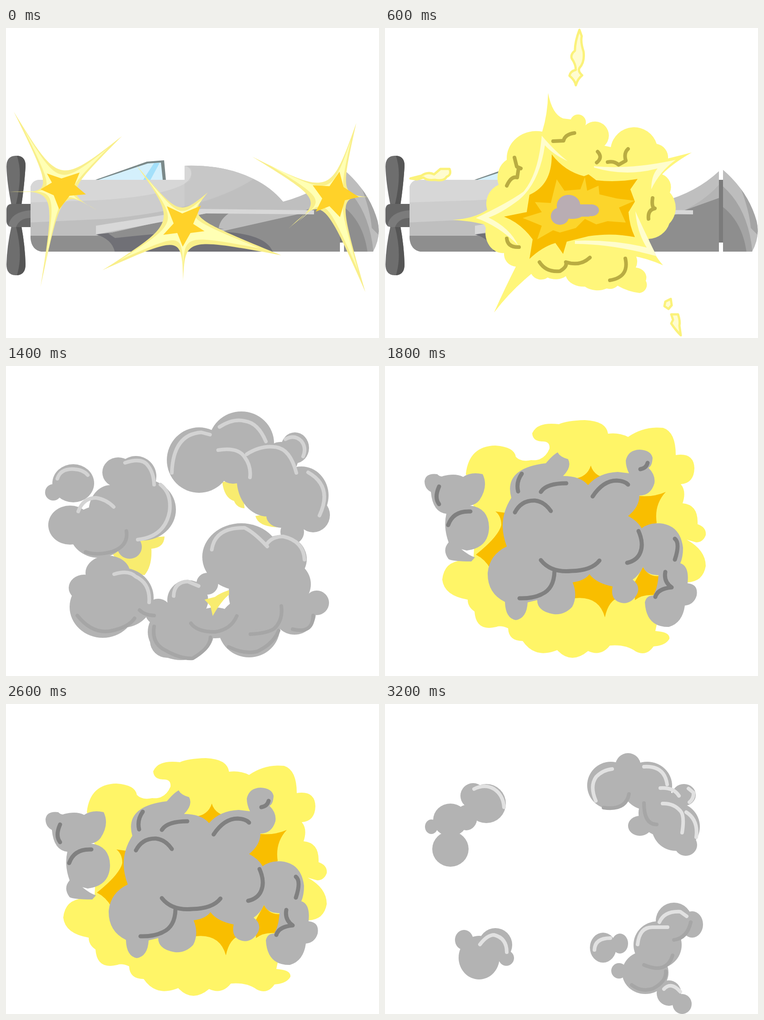
Animation of 821x682 px, one loop 3.4 s. Source, as an HTML page without scripts:

```html
<!DOCTYPE html>
<html lang="en">
<head>
<meta charset="utf-8">
<title>Plane explosion</title>
<style>
html, body { margin: 0; width: 100%; height: 100%; overflow: hidden; background: #fff; }
svg { display: block; width: 100%; height: 100%; }
/* --k is the 200 ms step at which a drawing first appears */
.once, .cycle, .plane {
  opacity: 0;
  animation: once 3.4s step-end calc(var(--k, 0) * 200ms - 3402ms) infinite;
}
.cycle { animation-name: cycle; }
.plane { animation-name: plane; }
@keyframes once { 0% { opacity: 1 } 5.882%, 100% { opacity: 0 } }
@keyframes plane { 0% { opacity: 1 } 23.529%, 100% { opacity: 0 } }
@keyframes cycle {
  0%, 23.529%, 47.058% { opacity: 1 }
  5.882%, 29.411%, 52.941%, 100% { opacity: 0 }
}
.line { fill: none; stroke-width: 8; stroke-linecap: round; stroke-linejoin: round; }
.smoke { fill: #b3b3b3; }
.glow { fill: #f9ef8a; }
.pale { fill: #ffffb4; }
.core { fill: #ffd229; }
</style>
</head>
<body>
<svg viewBox="0 0 821 682" preserveAspectRatio="none">
<defs>
  <clipPath id="body"><path id="hull" d="M54 350Q58 334 76 334H393V303Q480 300 545 332Q583 350 610 382Q685 362 735 315V492H78Q56 488 54 462Z"/></clipPath>
  <clipPath id="fin"><path d="M744 312Q800 360 818 425Q826 460 808 492H744Z"/></clipPath>

  <path id="s1" d="M17 184C117 346 117 346 255 238C132 363 132 363 201 401C122 355 122 355 76 570C109 358 109 358 6 360C105 363 105 363 17 184Z"/>
  <path id="s2" d="M287 302C381 413 381 413 444 362C401 416 401 416 606 500C394 461 394 461 390 558C387 455 387 455 212 533C377 428 377 428 287 302Z"/>
  <path id="s3" d="M771 209C736 367 736 367 811 373C730 368 730 368 791 581C698 370 698 370 622 441C697 379 697 379 542 283C714 369 714 369 771 209Z"/>
  <g id="star1">
    <use href="#s1" class="glow"/>
    <use href="#s1" class="pale" transform="translate(117 357) scale(.78) translate(-117 -357)"/>
    <path class="core" d="M90 320L122 331 162 318 151 345 176 366 140 369 117 399 105 368 76 355 101 340Z"/>
  </g>
  <g id="star2">
    <use href="#s2" class="glow"/>
    <use href="#s2" class="pale" transform="translate(389 430) scale(.78) translate(-389 -430)"/>
    <path class="core" d="M354 392L388 408 429 391 412 431 437 447 406 451 389 481 377 451 346 455 369 430Z"/>
  </g>
  <g id="star3">
    <use href="#s3" class="glow"/>
    <use href="#s3" class="pale" transform="translate(720 371) scale(.78) translate(-720 -371)"/>
    <path class="core" d="M734 316L743 350 777 372 746 379 735 416 712 392 682 404 696 375 675 346 712 348Z"/>
  </g>

  <g id="burst">
    <path fill="#fff67a" d="M359 143Q368 190 392 199L409 201A17 17 0 0 1 441 214A28 28 0 0 1 483 259L497 262A52 52 0 0 1 598 255A30 30 0 0 1 623 287L675 274Q630 300 610 322A30 30 0 0 1 627 362A50 50 0 0 1 626 430A50 50 0 0 1 580 464Q588 495 612 522Q580 508 553 503A20 25 0 0 1 552 527A25 22 0 0 1 574 556A18 18 0 0 1 560 583Q535 580 512 567A25 25 0 0 1 488 573A40 30 0 0 1 440 569A40 30 0 0 1 398 546A30 20 0 0 1 358 549A25 25 0 0 1 322 541Q275 580 240 626Q265 570 288 525A28 28 0 0 1 262 495A38 45 0 0 1 222 440L218 432Q185 424 148 422Q195 420 225 400A45 45 0 0 1 250 345A40 45 0 0 1 268 290A65 60 0 0 1 346 228Q358 190 359 143Z"/>
    <g fill="#fffdcd">
      <path d="M345 237Q375 272 402 293Q370 278 352 258Q340 340 295 378Q255 408 228 417Q275 440 293 478Q250 435 200 418Q270 385 305 360Q338 320 345 237Z"/>
      <path d="M460 304Q540 312 640 290Q605 315 586 355Q586 325 600 309Q530 328 460 307Z"/>
      <path d="M418 468Q500 465 576 483Q555 450 551 403Q572 450 598 502Q500 475 418 475Z"/>
    </g>
    <path fill="#f8bd00" d="M367 278Q395 315 438 326L448 322 465 335Q510 340 556 332L540 355 550 382 536 405Q538 435 550 460Q500 450 448 458L400 470 392 497 375 473Q345 482 318 508L325 465Q300 430 262 415L312 405 318 367Q368 345 367 278Z"/>
    <path fill="#fcd52b" d="M378 333L395 358 430 355 440 328 445 358 470 347 472 366 510 375 550 380 515 395 530 428 490 425 465 432 440 420 420 440 385 450 370 445 335 465 345 435 303 418 345 405 330 383 365 385Z"/>
    <g fill="#b9adb3">
      <ellipse cx="404" cy="391" rx="26" ry="24"/><ellipse cx="385" cy="414" rx="20" ry="19"/>
      <ellipse cx="412" cy="406" rx="27" ry="14"/><ellipse cx="454" cy="401" rx="17" ry="13"/>
      <path d="M420 388H450V415H420Z"/>
    </g>
    <path class="line" stroke="#b9ac42" stroke-width="7" d="M370 249L393 248Q396 234 417 231M285 285L290 305 299 309M268 347Q278 325 291 329L294 308M468 272Q480 285 466 296M490 295Q505 292 514 301L530 292Q525 275 535 266M589 374Q586 395 594 397Q578 400 580 420M268 463Q270 483 295 482M340 515Q355 538 385 535Q402 525 398 515Q430 525 451 505M529 507Q538 548 495 555"/>
  </g>

  <g id="shards" fill="#fffcd0" stroke="#fbf27a" stroke-width="5" stroke-linejoin="round">
    <path d="M428 4Q418 30 418 50Q408 58 411 67Q420 80 420 92Q408 95 406 105Q418 115 420 126Q424 112 434 104Q424 95 428 88Q440 75 437 52Q430 30 433 18Z"/>
    <path d="M629 596L631 610 624 618 615 612 617 602Z"/>
    <path d="M630 630L645 630Q650 645 648 655L651 676Q640 665 630 650L634 642Z"/>
  </g>
  <path id="shard" fill="#fffcd0" stroke="#fbf27a" stroke-width="5" stroke-linejoin="round" d="M56 331L80 325Q95 315 108 322L122 310 142 310Q147 323 136 327Q130 338 110 334Q92 336 85 329L70 333Z"/>

  <path id="cloud" d="M178 237Q185 176 243 175Q285 178 288 200Q300 212 322 207Q350 210 362 182Q364 165 345 166Q325 165 324 148Q335 122 383 128Q400 120 440 119Q487 121 491 149Q515 146 535 156Q570 132 612 136Q640 145 640 196Q680 190 681 225Q680 258 651 260Q664 275 655 302Q690 305 688 348Q708 355 706 372Q700 388 685 388L664 382Q706 405 706 440Q700 475 665 476L600 560 595 583Q628 585 626 600Q618 615 591 617Q575 640 552 628Q530 612 495 615Q475 640 447 627Q410 658 379 625Q330 645 303 605Q272 605 271 577Q255 570 245 574Q200 585 197 540Q182 530 182 514Q130 505 126 470Q130 430 170 428L195 420 200 330Z"/>

  <path id="plume" class="smoke" d="M354 214Q370 195 380 190Q385 200 403 205Q412 222 392 242Q430 242 447 262Q470 235 512 233L537 236Q530 222 530 208Q535 185 560 184Q585 185 589 202Q588 220 580 224Q596 240 593 258Q585 285 560 285Q560 310 535 330Q555 340 565 357Q580 345 605 346Q650 350 656 400Q656 420 650 434Q670 440 666 478Q690 480 686 505Q680 525 660 527Q655 565 625 574Q575 575 572 520Q575 505 590 505Q600 490 602 460Q575 460 568 442Q560 460 545 470Q565 485 553 505Q540 525 520 521Q495 515 501 485Q465 478 450 458Q440 472 413 476Q425 505 412 530Q395 548 372 546Q335 540 335 515L314 520Q312 555 288 559Q265 555 264 519Q225 500 226 455Q230 415 268 397Q246 340 278 290Q260 225 354 214Z"/>

  <g id="ring">
    <path fill="#f8ec6f" d="M232 410Q265 460 305 460Q322 440 320 402Q348 400 349 375L280 380ZM476 255Q480 290 502 297Q508 312 525 313L520 250ZM549 330Q555 355 605 355L580 325Z"/>
    <g class="smoke">
      <ellipse cx="148" cy="258" rx="46" ry="42"/><circle cx="104" cy="278" r="18"/>
      <ellipse cx="247" cy="234" rx="35" ry="33"/><circle cx="286" cy="243" r="45"/>
      <ellipse cx="300" cy="316" rx="74" ry="68"/><ellipse cx="230" cy="320" rx="48" ry="58"/>
      <ellipse cx="141" cy="350" rx="48" ry="43"/><ellipse cx="204" cy="365" rx="64" ry="57"/>
      <ellipse cx="272" cy="398" rx="27" ry="26"/>
      <ellipse cx="224" cy="455" rx="49" ry="38"/><ellipse cx="172" cy="488" rx="34" ry="29"/>
      <ellipse cx="213" cy="530" rx="73" ry="68"/><ellipse cx="255" cy="510" rx="70" ry="66"/>
      <circle cx="335" cy="541" r="29"/><ellipse cx="385" cy="585" rx="73" ry="62"/>
      <ellipse cx="400" cy="515" rx="45" ry="44"/><circle cx="443" cy="479" r="24"/>
      <ellipse cx="355" cy="605" rx="38" ry="37"/><ellipse cx="460" cy="565" rx="48" ry="34"/>
      <ellipse cx="535" cy="575" rx="68" ry="66"/><ellipse cx="518" cy="420" rx="86" ry="74"/>
      <ellipse cx="605" cy="425" rx="57" ry="53"/><circle cx="620" cy="480" r="51"/>
      <ellipse cx="555" cy="500" rx="65" ry="80"/><circle cx="635" cy="544" r="47"/>
      <circle cx="684" cy="521" r="27"/>
      <ellipse cx="425" cy="207" rx="71" ry="72"/><ellipse cx="518" cy="170" rx="72" ry="70"/>
      <ellipse cx="500" cy="215" rx="40" ry="44"/><ellipse cx="575" cy="250" rx="67" ry="81"/>
      <ellipse cx="636" cy="180" rx="31" ry="34"/><circle cx="605" cy="205" r="38"/>
      <ellipse cx="650" cy="285" rx="60" ry="64"/><ellipse cx="676" cy="328" rx="37" ry="38"/>
      <ellipse cx="630" cy="365" rx="26" ry="27"/><ellipse cx="607" cy="330" rx="34" ry="26"/>
    </g>
    <path fill="#f8ec6f" d="M437 514L450 528 455 550Q475 515 491 503V493Q470 500 460 508Z"/>
    <path class="line" stroke="#d3d3d3" d="M113 248Q120 225 150 227Q170 228 180 240M262 213Q300 200 313 220Q325 235 326 261M159 320Q170 290 198 290Q220 293 237 310M340 261Q365 280 360 320Q350 375 290 382M238 458Q270 448 285 463Q318 478 315 520M365 235Q368 150 430 146L449 151M470 134Q500 115 525 121Q555 125 572 166M467 185Q510 178 525 200Q540 220 537 245M530 194Q560 175 590 178Q625 180 639 235M615 161Q635 150 650 165Q662 180 654 199M665 234Q720 265 690 329M453 404Q460 355 525 356Q545 365 575 397M573 393Q585 375 610 375Q655 385 657 426M369 506Q370 475 400 474L424 484"/>
    <path class="line" stroke="#a6a6a6" d="M175 409Q200 418 235 408Q270 395 265 363M157 549Q190 590 230 583Q270 575 283 555M294 537Q305 548 326 549M326 573Q320 610 350 625Q385 645 411 643Q450 620 450 597M407 566Q420 585 460 585Q495 580 508 550M490 618Q525 635 553 628Q590 610 600 582M538 590Q575 588 590 578Q610 560 606 528M631 579Q675 590 676 549"/>
  </g>
</defs>

<g class="plane">
  <path fill="#6e6e6e" d="M22 281Q44 281 43 305Q40 350 34 390H12Q2 340 1 305Q1 281 22 281ZM12 436H34Q42 480 43 520Q43 544 22 544Q1 544 1 520Q2 480 12 436Z"/>
  <path fill="#555" d="M24 281Q44 282 43 305Q40 350 34 388H22Q38 320 24 281ZM22 437H34Q42 480 43 520Q43 543 24 544Q38 500 22 437Z"/>
  <path fill="#666" d="M14 387H54V438H14Q1 437 1 424V400Q1 387 14 387Z"/>
  <path fill="#7b7b7b" d="M5 436Q10 404 54 401V418Q30 418 22 438H14Z"/>
  <path fill="#7b8989" d="M194 335L310 294 348 291 352 335Z"/>
  <path fill="#d4f0fc" d="M203 334L312 298 341 296 345 334Z"/>
  <path fill="#a3e0fa" d="M302 334L326 297H338L318 334Z"/>
  <g clip-path="url(#body)">
    <path fill="#bfbfbf" d="M50 290H740V495H50Z"/>
    <path fill="#cdcdcd" d="M50 300H480L545 332Q440 400 220 420L50 428Z"/>
    <path fill="#d7d7d7" d="M50 300H393Q415 312 405 335Q360 370 200 379L50 384Z"/>
    <path fill="#c3c3c3" d="M393 342Q412 330 407 309L393 303H480L545 332Q480 375 393 393Z" opacity=".55"/>
    <path fill="#ababab" d="M610 420Q690 395 735 345V400L610 470Z" opacity=".55"/>
    <path fill="#8e8e8e" d="M50 457H200L440 408H640L735 374V495H50Z"/>
    <path fill="#bdbdbd" d="M490 408H650L468 449Q466 425 490 408Z"/>
    <path fill="#707076" d="M198 454Q330 438 470 448Q575 452 588 495H240Q235 465 198 454Z"/>
    <path fill="#8e8e8e" d="M225 452L345 425 480 442Q350 450 240 462Z"/>
    <path fill="#d8d8d8" d="M198 435L430 398 678 401V410L440 408 198 454Z"/>
  </g>
  <g clip-path="url(#fin)">
    <path fill="#bdbdbd" d="M740 300H825V495H740Z"/>
    <path fill="#a4a4a4" d="M740 345Q800 395 809 495H740ZM780 345Q802 400 805 440L825 460V370Z"/>
    <path fill="#8e8e8e" d="M740 391Q787 425 796 495H740Z"/>
  </g>
  <path fill="#7b7b7b" d="M735 334H744V472H735Z"/>
</g>

<g class="once" style="--k:0"><use href="#star1"/><use href="#star3"/><use href="#star2"/></g>

<g class="once" style="--k:1">
  <use href="#star1" transform="translate(117 357) scale(.95) translate(-117 -357)"/>
  <use href="#star3" transform="translate(720 371) scale(.92) translate(-720 -371)"/>
  <use href="#star2" transform="translate(400 385) scale(1.6) translate(-389 -410)"/>
</g>

<g class="once" style="--k:2">
  <path id="flash" class="glow" d="M425 24C435 370 435 370 821 230C500 400 500 400 655 675C430 440 430 440 205 650C350 410 350 410 2 335C370 360 370 360 425 24Z"/>
  <use href="#flash" style="fill:#ffffb4" transform="translate(415 385) scale(.78) translate(-415 -385)"/>
  <use href="#burst" transform="translate(410 395) scale(.62) translate(-410 -395)"/>
</g>

<g class="once" style="--k:3"><use href="#shards"/><use href="#shard"/><use href="#burst"/></g>

<g class="cycle" style="--k:4">
  <use href="#shards"/><use href="#shard" x="-46"/>
  <use href="#burst" transform="translate(410 392) scale(1.12) translate(-410 -392)"/>
  <use href="#plume" transform="translate(415 395) scale(.48) translate(-430 -370)"/>
</g>

<g class="cycle" style="--k:5">
  <use href="#cloud" fill="#fff567"/>
  <path fill="#f9be00" d="M453 219Q445 245 415 248L450 300 500 250Q460 245 453 219ZM618 277Q590 290 550 285L520 340 570 370 598 345Q592 305 618 277ZM243 320Q256 330 256 350Q250 375 200 415Q220 425 232 446L290 400 280 325ZM400 470L410 512Q470 502 484 553Q492 515 515 510L505 470 455 450ZM568 442Q580 465 605 462L600 505Q570 500 550 515V475Z"/>
  <use href="#plume"/>
  <path class="smoke" d="M87 253Q90 235 115 238Q122 245 128 242Q155 235 172 244Q190 232 215 238Q228 265 208 295Q200 305 187 307Q228 312 229 355Q228 400 180 406L168 403Q185 417 198 421L190 430Q150 430 140 425Q125 405 140 388Q128 355 135 325Q105 322 101 277Q87 270 87 253Z"/>
  <path class="line" style="stroke-width:9" stroke="#808080" d="M119 265Q108 290 119 304M139 350Q150 318 188 320M301 237Q288 255 293 276M343 277Q355 258 399 258M286 322Q300 295 330 296Q350 298 365 319M457 287Q480 252 510 252Q528 253 535 261M562 227Q575 225 578 213M558 363Q570 390 562 410Q555 428 533 433M343 427Q365 455 410 451Q455 450 472 428M373 452Q372 490 345 502Q325 512 296 511M638 380Q650 390 638 426M617 453Q613 475 631 487Q600 490 595 508"/>
</g>

<g class="cycle" style="--k:6">
  <use href="#cloud" fill="#f9ee70"/>
  <ellipse cx="425" cy="335" rx="85" ry="78" fill="#fff"/>
  <use href="#ring" x="10" y="-7"/>
</g>

<g class="cycle" style="--k:7"><use href="#ring"/></g>

<g class="once" style="--k:16">
  <g class="smoke">
    <ellipse cx="102" cy="270" rx="14" ry="16"/><ellipse cx="144" cy="255" rx="38" ry="36"/>
    <ellipse cx="144" cy="319" rx="40" ry="39"/><ellipse cx="179" cy="250" rx="24" ry="28"/>
    <circle cx="194" cy="202" r="28"/><circle cx="223" cy="219" r="43"/>
    <ellipse cx="174" cy="519" rx="20" ry="22"/><ellipse cx="207" cy="558" rx="45" ry="48"/>
    <circle cx="243" cy="530" r="37"/><circle cx="267" cy="559" r="17"/>
    <circle cx="497" cy="179" r="52"/><circle cx="535" cy="136" r="28"/>
    <ellipse cx="577" cy="180" rx="55" ry="53"/><ellipse cx="658" cy="200" rx="26" ry="24"/>
    <ellipse cx="561" cy="268" rx="26" ry="22"/><circle cx="608" cy="240" r="50"/>
    <ellipse cx="640" cy="270" rx="53" ry="53"/><ellipse cx="662" cy="310" rx="25" ry="24"/>
    <ellipse cx="480" cy="536" rx="29" ry="33"/><ellipse cx="517" cy="527" rx="18" ry="22"/>
    <circle cx="515" cy="587" r="17"/><ellipse cx="573" cy="591" rx="51" ry="47"/>
    <ellipse cx="600" cy="530" rx="53" ry="52"/><circle cx="636" cy="477" r="40"/>
    <ellipse cx="676" cy="485" rx="24" ry="29"/><ellipse cx="625" cy="636" rx="27" ry="28"/>
    <ellipse cx="654" cy="660" rx="21" ry="22"/>
  </g>
  <path class="line" stroke="#a6a6a6" d="M481 228Q530 235 537 198M570 218Q570 265 598 265M543 618Q565 635 590 626Q620 610 618 588M570 574Q620 595 633 553M636 519Q665 515 673 480"/>
  <path class="line" stroke="#e1e1e1" d="M196 187Q220 175 240 187Q260 200 262 227M209 529Q225 508 240 508Q268 515 268 546M464 213Q450 180 465 160Q480 145 500 143M570 138Q615 135 621 177M606 185Q635 183 647 202M668 186L679 195Q680 208 670 216M611 219Q635 218 650 235Q660 245 654 283M663 238Q690 255 685 293M461 541Q462 515 496 515M556 529Q560 490 590 491H622M604 480Q615 455 650 457L664 467M614 627Q630 610 650 633"/>
</g>
</svg>
</body>
</html>
```
